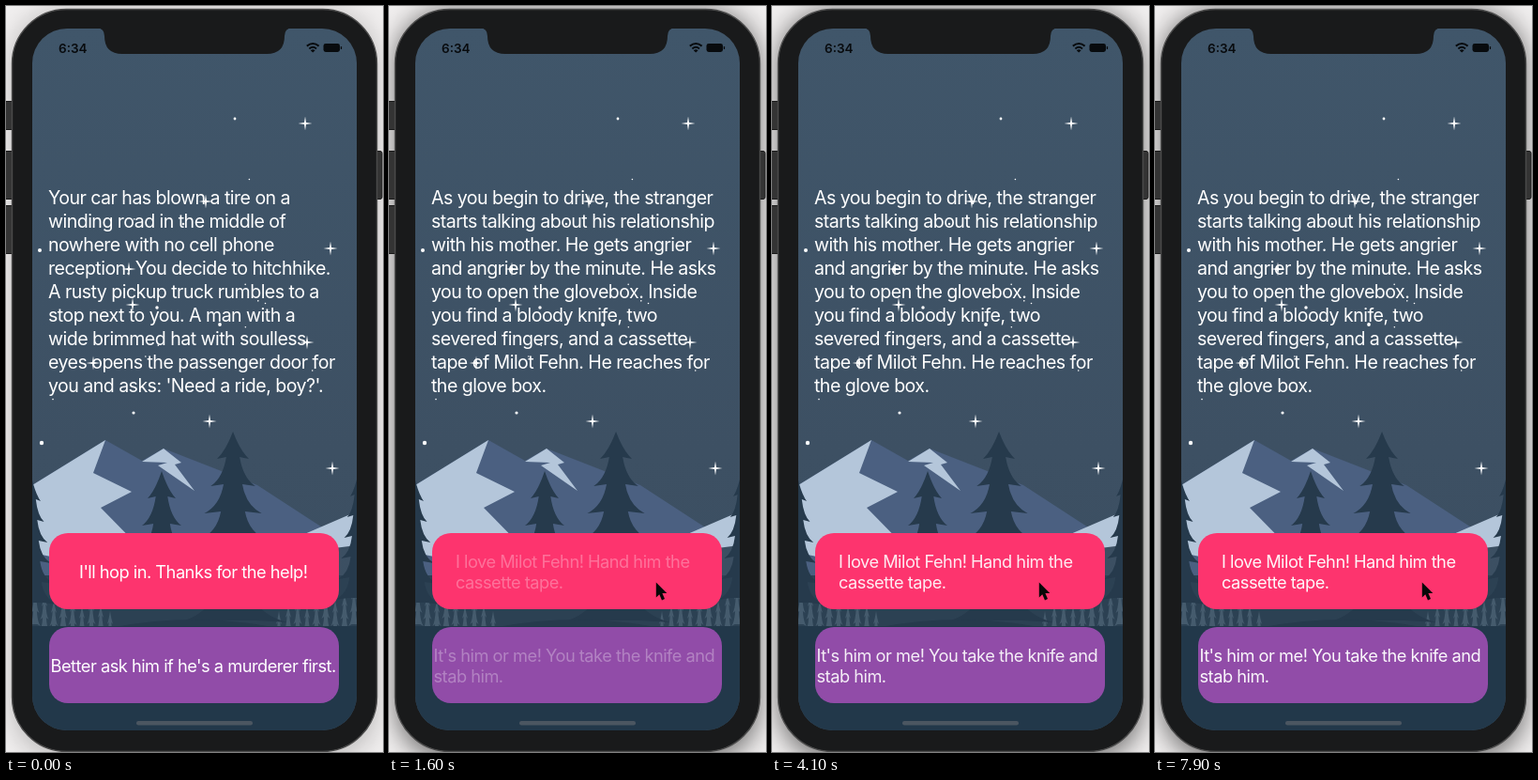
Write an HTML page that moves like this. It is 402 by 794 pixels and loops after 8 s.

```html
<!DOCTYPE html>
<html lang="en">
<head>
<meta charset="utf-8">
<title>Hitchhike story</title>
<style>
  html, body { margin: 0; width: 100%; height: 100%; overflow: hidden; background: #eee; }
  svg { display: block; width: 100%; height: 100%; }
  text { font-family: Inter, "Noto Sans", sans-serif; font-optical-sizing: none; letter-spacing: -.028em; fill: #fff; white-space: pre; }
  .story { font-size: 19.6px; }
  .choice { font-size: 18.25px; }
  .clock { font-size: 13.5px; font-weight: 600; fill: #080b0e; letter-spacing: 0; }
</style>
</head>
<body>
<svg viewBox="0 0 402 794" preserveAspectRatio="none">
  <defs>
    <linearGradient id="sky" x2="0" y2="1">
      <stop offset="0" stop-color="#40566a"/><stop offset=".6" stop-color="#3d5063"/><stop offset="1" stop-color="#3a4e61"/>
    </linearGradient>
    <filter id="soft" x="-20%" y="-20%" width="140%" height="140%"><feGaussianBlur stdDeviation="13"/></filter>
    <clipPath id="screen"><rect x="28" y="24" width="346" height="747" rx="37"/></clipPath>
  </defs>

  <rect width="402" height="794" fill="#f0eeee"/>
  <rect id="shadow" x="6" y="3" width="390" height="800" rx="58" filter="url(#soft)"/>
  <g fill="#343434" stroke="#191919">
    <rect x="-3" y="101.5" width="11" height="30" rx="2"/>
    <rect x="-3" y="154.5" width="11" height="51" rx="2"/>
    <rect x="-3" y="212.5" width="11" height="51" rx="2"/>
    <rect x="393" y="154.5" width="8" height="51" rx="2"/>
  </g>
  <rect x="6.5" y="3.5" width="389" height="790" rx="58" fill="#191a1b" stroke="#4b4b4b" stroke-width="1.4"/>

  <g clip-path="url(#screen)">
    <rect x="28" y="24" width="346" height="747" fill="url(#sky)"/>
    <path fill="#4b6081" d="M28 510 106 462 145 484 168 471 268 510 345 560V660H28Z"/>
    <g fill="#b4c6da">
      <path d="M106 462 93 497 134 517 101 534 156 590 78 592 28 582V510Z"/>
      <path d="M145 485 168 471 187 486 180 488 201 516 162 489 172 486Z"/>
      <path d="M374 538 316 563 334 568 326 580 374 574Z"/>
    </g>
    <g id="trees"></g>
    <rect x="28" y="660" width="346" height="111" fill="#22384a"/>
    <g id="stars" fill="#fff"></g>
  </g>
  <path fill="#191a1b" d="M97 23H305Q297 24 297 32 297 51 278 51H124Q105 51 105 32 105 24 97 23Z"/>

  <text class="clock" x="56" y="49.5">6:34</text>
  <g fill="none" stroke="#080b0e" stroke-width="2">
    <path d="M320.8 42.6Q327.2 37.4 333.6 42.6M323.4 45.4Q327.2 42.2 331 45.4"/>
    <path fill="#080b0e" stroke="none" d="M324.8 47.2Q327.2 45.4 329.6 47.2L327.2 49.5Z"/>
  </g>
  <rect x="338.5" y="40" width="17.5" height="9" rx="2.4" fill="#080b0e"/>
  <rect x="356.8" y="43" width="1.3" height="3" rx=".6" fill="#080b0e"/>
  <rect x="139" y="761" width="124" height="4.5" rx="2.2" fill="#4b5661"/>

  <g id="story"></g>
  <g id="first"><rect x="46" y="561" width="309" height="81" rx="20" fill="#fd346e"/><g id="firstTitle"></g></g>
  <g><rect x="46" y="661" width="309" height="81" rx="20" fill="#914ca8"/><g id="secondTitle"></g></g>
  <path id="cursor" fill="#080808" stroke="#fff" d="M0 0V16L3.5 12.8 6.2 19 9.2 17.6 6.6 11.6H11.5Z"/>
</svg>

<script>
const LOOP = 8000, SWITCH = 1500;
const el = id => document.getElementById(id);
const set = (id, name, value) => el(id).setAttribute(name, value);
const clamp = (v, lo = 0, hi = 1) => Math.min(hi, Math.max(lo, v));

const scenes = [
  {
    story: ["Your car has blown a tire on a", "winding road in the middle of", "nowhere with no cell phone",
      "reception. You decide to hitchhike.", "A rusty pickup truck rumbles to a", "stop next to you. A man with a",
      "wide brimmed hat with soulless", "eyes opens the passenger door for", "you and asks: 'Need a ride, boy?'."],
    first: ["I'll hop in. Thanks for the help!"],
    second: ["Better ask him if he's a murderer first."],
    firstX: 78
  },
  {
    story: ["As you begin to drive, the stranger", "starts talking about his relationship", "with his mother. He gets angrier",
      "and angrier by the minute. He asks", "you to open the glovebox. Inside", "you find a bloody knife, two",
      "severed fingers, and a cassette", "tape of Milot Fehn. He reaches for", "the glove box."],
    first: ["I love Milot Fehn! Hand him the", "cassette tape."],
    second: ["It's him or me! You take the knife and", "stab him."],
    firstX: 71
  }
];

const textLines = (lines, cls, x, y, step) => lines.map((line, i) =>
  `<text class="${cls}" x="${x}" y="${y + i * step}">${line}</text>`).join("");
const title = (lines, x, middle) =>
  textLines(lines, "choice", x, middle + 7 - (lines.length - 1) * 11.4, 22.8);

// Every tier is one step lower and a little wider, with a concave upper edge.
function tree(cx, top, step, tiers, width, fill) {
  const side = s => {
    let d = `M${cx} ${top}`;
    for (let i = 0; i < tiers; i++) {
      const w = s * width * (1 + i * .4), y = top + (i + 1) * step;
      d += `Q${cx + w * .45} ${y - step * .3} ${cx + w} ${y}L${cx + w * .42} ${y - 2}`;
    }
    return d + `H${cx}Z`;
  };
  return `<path fill="${fill}" d="${side(1)}${side(-1)}"/>`;
}

function drawTrees() {
  const dark = "#263a4c", mist = "#455b6d";
  let out = `<rect x="28" y="606" width="346" height="54" fill="#2c4153"/>`;
  for (let i = 0; i < 9; i++) {
    const top = 618 + i * 2 + i % 3 * 5;
    for (const x of [31 + i * 10, 371 - i * 10]) out += tree(x, top, 14, 3, 3.2, mist);
  }
  out += tree(28, 505, 22, 6, 9, dark) + tree(375, 500, 22, 6, 8, dark);
  out += tree(166, 495, 29, 5, 15, dark) + tree(242, 453, 29, 7, 17, dark);
  el("trees").innerHTML = out + `<path fill="${dark}" d="M116 661Q200 645 285 661Z"/>`;
}

function seeded(seed) {
  return () => (seed = seed * 16807 % 2147483647) / 2147483647;
}

function drawStars() {
  const sparkles = [[319, 125], [346, 258], [213, 208], [131, 280], [135, 318], [217, 442], [348, 492], [93, 380], [321, 358]];
  const dots = [[38, 465], [36, 260], [228, 339], [161, 321], [136, 433], [244, 120], [189, 232]];
  const r = 7.5, random = seeded(7);
  const circle = (x, y, size) => `<circle cx="${x}" cy="${y}" r="${size}"/>`;
  let out = sparkles.map(([x, y]) =>
    `<path d="M${x} ${y - r}l1 ${r - 1} ${r - 1} 1 ${1 - r} 1-1 ${r - 1}-1 ${1 - r} ${1 - r}-1 ${r - 1}-1Z"/>`).join("");
  out += dots.map(([x, y], i) => circle(x, y, 2.2 - i * .16)).join("");
  for (let i = 0; i < 11; i++) out += circle(50 + random() * 300, 170 + random() * 270, .8);
  el("stars").innerHTML = out;
}

let shown;
function showScene(scene) {
  if (scene === shown) return;
  shown = scene;
  el("story").innerHTML = textLines(scene.story, "story", 45, 211.3, 24.95);
  el("firstTitle").innerHTML = title(scene.first, scene.firstX, 602);
  el("secondTitle").innerHTML = title(scene.second, 47.5, 702);
}

function render(t) {
  const switched = t >= SWITCH;
  showScene(scenes[+switched]);

  const press = clamp(Math.min(t - 1100, 1600 - t) / 200);
  set("first", "opacity", 1 - .47 * press);

  const fade = switched ? Math.min((t - 1450) / 500, .96 - .26 * Math.exp((1800 - t) / 1500)) : 1;
  set("firstTitle", "opacity", fade);
  set("secondTitle", "opacity", fade);

  // The window gains focus on the click, which deepens its shadow.
  set("shadow", "opacity", t < 1200 ? .2 : .5);

  const away = (1 - clamp((t - 100) / 850)) ** 2;
  set("cursor", "transform", `translate(${284.8 + 118 * away} ${613.5 + 178 * away})`);
  set("cursor", "visibility", t < 100 ? "hidden" : "visible");
  set("cursor", "stroke-opacity", switched ? 0 : .8);
}

drawTrees();
drawStars();
const start = performance.now();
function tick() {
  render((performance.now() - start) % LOOP);
  requestAnimationFrame(tick);
}
tick();
</script>
</body>
</html>
```
